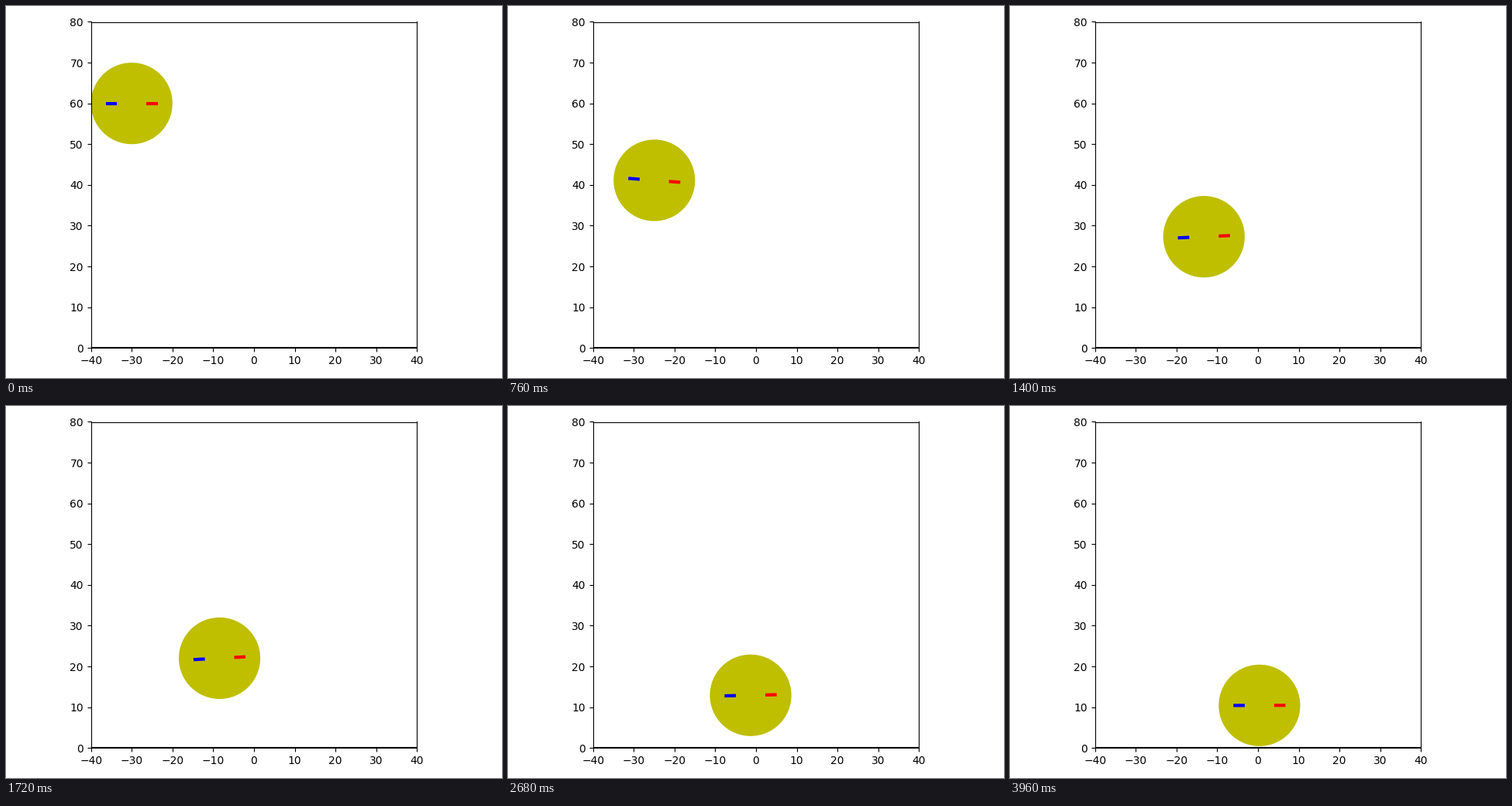
Animation of 640 by 480 pixels, one loop 4 s. Source, as a matplotlib script:

```python
import math
import numpy as np
import matplotlib.pyplot as plt
from matplotlib.animation import FuncAnimation
from matplotlib.patches import Circle

FRAMES = 100
INTERVAL = 40
RADIUS = 10
ARM = 5             # distance from the centre to each thruster
HALF = 1            # half length of a thruster
GRAVITY = 0.4       # sideways pull per radian of tilt, in units per frame^2

START_X, TRAVEL, LAG_X = -30, 30.5, 8.95
START_Y, REST_Y, LAG_Y = 60, 10.1, 14
BRAKE, BRAKE_AT = 0.0575, 36


def drift(n):
    """Sideways position: step response of four equal lags."""
    s = n / LAG_X
    return START_X + TRAVEL * (1 - math.exp(-s) * (1 + s + s**2 / 2 + s**3 / 6))


def descent(n):
    """Height: critically damped fall with a soft braking hump."""
    s, z = n / LAG_Y, n / BRAKE_AT
    fall = math.exp(-s) * (1 + s)
    hump = BRAKE * (z * math.exp(1 - z)) ** 8
    return REST_Y + (START_Y - REST_Y) * (fall + hump)


def tilt(n):
    """Lean that produces the sideways acceleration of drift()."""
    s = n / LAG_X
    push = TRAVEL / (6 * LAG_X**2) * s**2 * (3 - s) * math.exp(-s)
    return -push / GRAVITY


fig, ax = plt.subplots(figsize=(6.4, 4.8), dpi=100)
ax.set_xlim(-40, 40)
ax.set_ylim(0, 80)
ax.set_aspect("equal")
fig.tight_layout()

ax.plot([-40, 40], [0, 0], "k")
body = ax.add_patch(Circle((START_X, START_Y), RADIUS, fc="y", ec="none"))
left, = ax.plot([], [], "b", lw=3)
right, = ax.plot([], [], "r", lw=3)


def update(n):
    x, y, a = drift(n), descent(n), tilt(n)
    body.center = x, y
    for line, offset in ((left, -ARM), (right, ARM)):
        d = offset + np.array([-HALF, HALF])
        line.set_data(x + d * math.cos(a), y + d * math.sin(a))
    return body, left, right


def init():
    return update(0)


anim = FuncAnimation(fig, update, frames=FRAMES, init_func=init,
                     interval=INTERVAL, repeat=True, repeat_delay=0)
plt.show()
```
